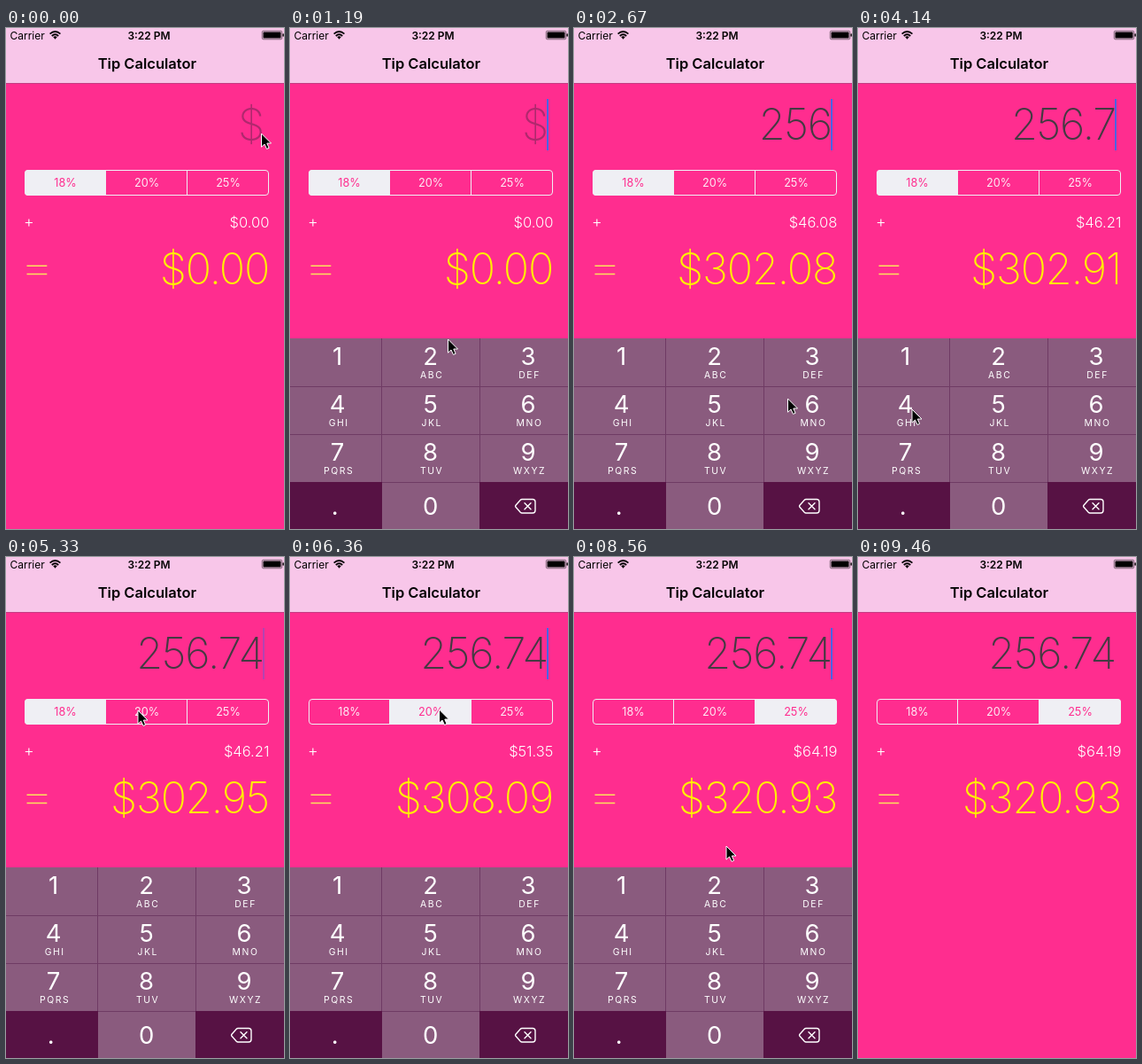
An HTML page that plays this animation: 314 by 565 pixels, repeating every 9.75 s.

```html
<!DOCTYPE html>
<html lang="en">
<head>
<meta charset="utf-8">
<title>Tip Calculator</title>
<style>
  html, body { margin: 0; width: 100%; height: 100%; overflow: hidden; background: #ff2d8f; }
  svg { display: block; font-family: Inter, Roboto, "Liberation Sans", sans-serif; }
  .mid { text-anchor: middle; }
  .end { text-anchor: end; }
  .big { font-size: 48.5px; font-weight: 150; letter-spacing: -1.1px; }
  .seg { font-size: 12.7px; }
  .digit { font-size: 27.5px; font-weight: 400; fill: #fff; }
  .letters { font-size: 10.4px; letter-spacing: 1.6px; fill: #fff; }
</style>
</head>
<body>
<svg width="314" height="565" viewBox="0 0 314 565">
  <defs><clipPath id="round"><rect x="21" y="160" width="276" height="29" rx="4"/></clipPath></defs>
  <rect width="314" height="565" fill="#ff2d8f"/>

  <!-- status and title bars -->
  <rect width="314" height="62" fill="#f8c6e9"/>
  <rect y="62" width="314" height="1" fill="#c43c82"/>
  <text x="4.5" y="12.8" font-size="12">Carrier</text>
  <g fill="none" stroke="#000" stroke-width="1.8">
    <path d="M49.6 6.6Q55.5 1.4 61.4 6.6M51.8 9Q55.5 5.6 59.2 9"/>
    <path d="M53.2 10.1Q55.5 8.2 57.8 10.1L55.5 12.7Z" fill="#000" stroke="none"/>
  </g>
  <text class="mid" x="161.5" y="12.8" font-size="12" font-weight="600">3:22 PM</text>
  <rect x="289.25" y="3.25" width="22.5" height="9.5" rx="1.5" fill="none" stroke="#000" stroke-width=".5"/>
  <rect x="290.5" y="4.5" width="20" height="7" rx=".6"/>
  <rect x="312.4" y="6.2" width="1.4" height="3.6" rx=".7"/>
  <text class="mid" x="159.4" y="46" font-size="16.5" font-weight="600">Tip Calculator</text>

  <!-- bill, rates and totals -->
  <text id="bill" class="big end" x="291" y="126.3"></text>
  <rect id="caret" x="290" y="80" width="2" height="58" fill="#4a62e4"/>
  <rect id="chosen" y="160" width="92" height="29" fill="#efeff4" clip-path="url(#round)"/>
  <path d="M112.5 160.5V188.5M204.5 160.5V188.5" stroke="#efeff4"/>
  <rect x="21.5" y="160.5" width="275" height="28" rx="3.5" fill="none" stroke="#efeff4"/>
  <g id="rates"></g>
  <text class="mid" x="26" y="224.5" font-size="18" font-weight="350" fill="#fff">+</text>
  <text id="tip" class="end" x="297.4" y="224.7" font-size="16.5" font-weight="350" fill="#fff"></text>
  <path d="M23.5 268.3H46.3M23.5 277.5H46.3" stroke="#fbe45c" stroke-width="1.5"/>
  <text id="total" class="big end" x="297.2" y="288.8" fill="#fff000"></text>

  <g id="pad"></g>
  <path id="mouse" d="M0 0V15.2L3.5 12L6 17.4L8.6 16.3L6.3 11H11Z" fill="#000" stroke="#fff" stroke-width="1"/>
</svg>
<script>
const LOOP = 9750, STEPS = 66;
const $ = id => document.getElementById(id);
const LIGHT = '#8a5b7e', DARK = '#571244', PINK = '#ff2d8f';

const RATES = [18, 20, 25];
$('rates').innerHTML = RATES.map((r, i) =>
  `<text class="seg mid" x="${67 + 92 * i}" y="179">${r}%</text>`).join('');

// Keypad: label, letters
const KEYS = [['1', ''], ['2', 'ABC'], ['3', 'DEF'], ['4', 'GHI'], ['5', 'JKL'], ['6', 'MNO'],
  ['7', 'PQRS'], ['8', 'TUV'], ['9', 'WXYZ'], ['.', ''], ['0', ''], ['', '']];
const LEFT = [0, 104, 214, 314], CENTER = [53.6, 158.6, 269];
const restFill = label => label === '.' || !label ? DARK : LIGHT;

$('pad').innerHTML = KEYS.map(([label, letters], i) => {
  const col = i % 3, y = 350 + 54 * (i / 3 | 0);
  const base = y + (i > 8 ? 37 : 30), cx = CENTER[col] - (label === '.' ? 3 : 0);
  return `<rect class="key" x="${LEFT[col]}" y="${y}" width="${LEFT[col + 1] - LEFT[col]}" height="54"/>
    <text class="digit mid" x="${cx}" y="${base}">${label}</text>
    <text class="letters mid" x="${cx + 1.6}" y="${y + 45}">${letters}</text>`;
}).join('') +
  `<path d="M0 404.5H314M0 458.5H314M104 512.5H214M103.5 350V512M214.5 350V512" stroke="#6f3b64"/>
   <path d="M262 531.5H274Q277 531.5 277 534.5V544Q277 547 274 547H262Q261 547 260.3 546.3L255 540.3Q254.2 539.3 255 538.3L260.3 532.3Q261 531.5 262 531.5ZM265 535.7L272 542.7M272 535.7L265 542.7"
     fill="none" stroke="#fff" stroke-width="1.4" stroke-linecap="round"/>`;
const keyRects = document.querySelectorAll('.key');
const rateTexts = document.querySelectorAll('.seg');

// Step at which each key is held down
const PRESSES = [[9, '2'], [13, '5'], [17, '6'], [22, '.'], [25, '7'], [29, '4']];

// Pointer path: step, x, y
const PATH = [[0, 288.5, 119], [4, 288.5, 119], [8, 178.5, 351], [9, 161, 371], [11, 158, 374],
  [13, 156, 425], [14, 156, 426], [17, 241.5, 418], [18, 241.5, 418], [21, 70, 525], [22, 50, 537],
  [23, 50, 537], [25, 56, 483], [26, 58, 484], [28, 61, 430], [33, 61, 430], [36, 149, 173],
  [42, 149, 173], [46, 227, 169], [52, 227, 169], [56, 172, 326], [59, 172, 326], [64, 235, 570]];

function pointer(k) {
  const i = PATH.findIndex(p => p[0] > k);
  if (i < 0) return PATH[PATH.length - 1].slice(1);
  const [a, x, y] = PATH[i - 1], [b, u, v] = PATH[i], f = (k - a) / (b - a);
  return [x + (u - x) * f, y + (v - y) * f];
}

const ease = x => 1 - (1 - Math.min(1, Math.max(0, x))) ** 3;
const money = cents => '$' + (Math.round(cents) / 100).toFixed(2);
const within = (k, a, b) => k >= a && k <= b;

function caretAlpha(k) {
  if (k < 4 || k > 57 || k === 13) return 0;
  if ([[33, 35], [40, 42], [47, 49], [53, 56]].some(r => within(k, ...r))) return 0;
  return k === 36 ? 0.4 : 1;
}

function draw(k) {
  const typed = PRESSES.filter(p => k > p[0]).map(p => p[1]).join('');
  const cents = Math.round((parseFloat(typed) || 0) * 100);
  const choice = k < 40 ? 0 : k < 48 ? 1 : 2;
  const tip = cents * RATES[choice] / 100;

  $('bill').textContent = typed || '$';
  $('bill').setAttribute('fill', typed ? '#443a42' : '#b0286e');
  $('tip').textContent = money(tip);
  $('total').textContent = money(cents + tip);
  $('caret').setAttribute('opacity', caretAlpha(k));

  $('chosen').setAttribute('x', 21 + 92 * choice);
  rateTexts.forEach((t, i) => t.setAttribute('fill', i === choice ? PINK : '#fdeaf4'));

  const held = (PRESSES.find(p => p[0] === k) || [])[1];
  keyRects.forEach((rect, i) => {
    const label = KEYS[i][0], rest = restFill(label);
    rect.setAttribute('fill', label && label === held ? (rest === LIGHT ? DARK : LIGHT) : rest);
  });
  const drop = 216 * (1 - ease((k - 3) / 3) + ease((k - 57) / 4));
  $('pad').setAttribute('transform', `translate(0 ${drop})`);
  $('mouse').setAttribute('transform', `translate(${pointer(k)})`);
}

const start = performance.now();
function tick() {
  const t = (performance.now() - start) % LOOP;
  draw(Math.floor(t / LOOP * STEPS));
  requestAnimationFrame(tick);
}
tick();
</script>
</body>
</html>
```
